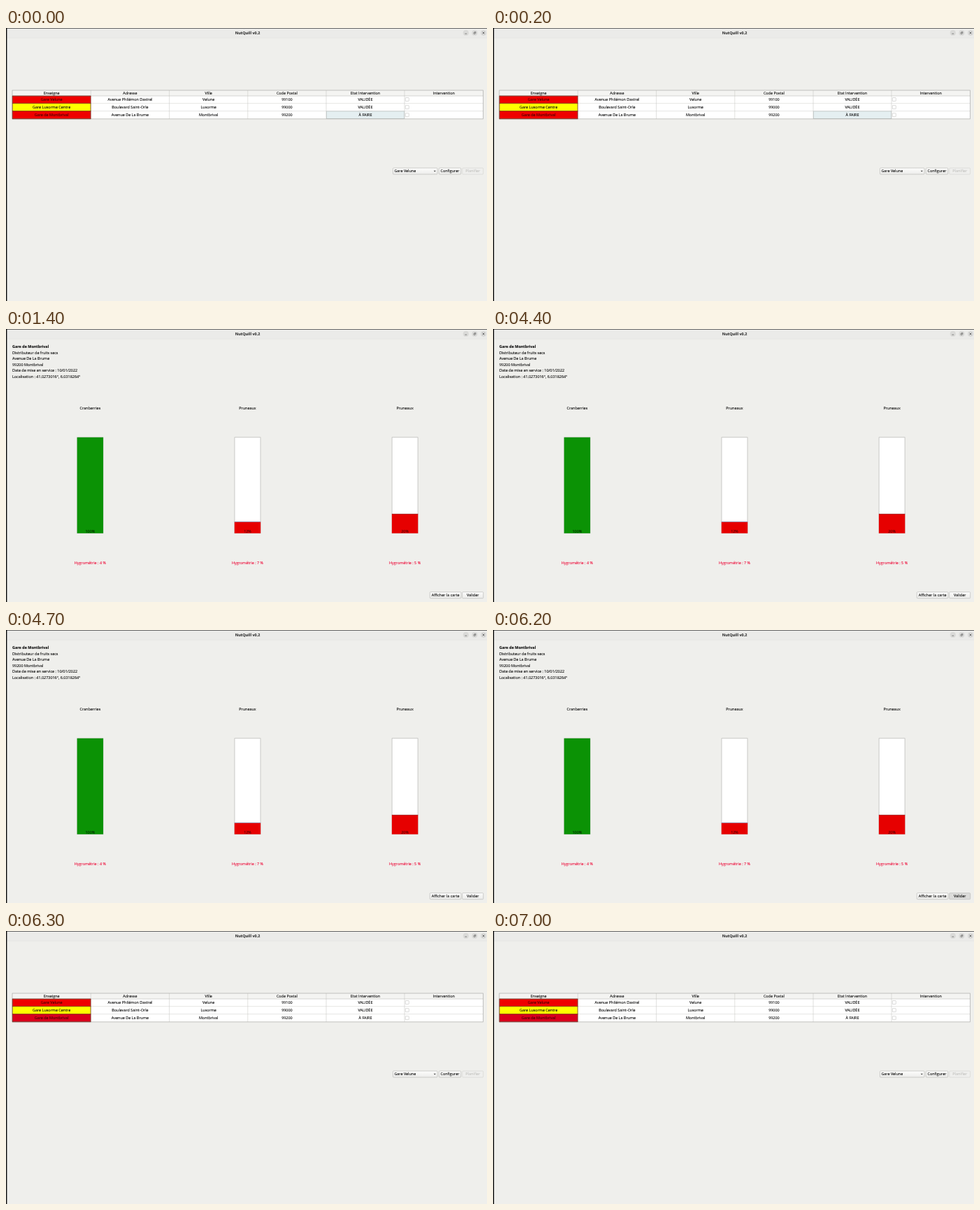
An HTML page for the animation above (8000 ms loop, 688 px wide and 390 px high).

```html
<!DOCTYPE html>
<html lang="fr">
<head>
<meta charset="utf-8">
<title>NutQuill</title>
<style>
  html, body { margin: 0; width: 100%; height: 100%; overflow: hidden; background: #efefec; }
  svg { display: block; width: 688px; height: 390px; }
  text {
    font: 500 5.45px "Open Sans", "Noto Sans", sans-serif;
    fill: #0c0c0c; stroke: currentColor; stroke-width: 0.1px; color: #0c0c0c;
    white-space: pre; text-rendering: geometricPrecision;
  }
  .bold { font-weight: 700; }
  .mid { text-anchor: middle; }
</style>
</head>
<body>
<svg id="stage" viewBox="0 0 688 390" xmlns="http://www.w3.org/2000/svg">
  <defs>
    <linearGradient id="face" x2="0" y2="1">
      <stop offset="0" stop-color="#fdfdfc"/>
      <stop offset="1" stop-color="#ececea"/>
    </linearGradient>
  </defs>
</svg>
<script>
const NS = 'http://www.w3.org/2000/svg';
const stage = document.getElementById('stage');

function add(parent, tag, attrs = {}) {
  const el = document.createElementNS(NS, tag);
  for (const key in attrs) el.setAttribute(key, attrs[key]);
  return parent.appendChild(el);
}

const rect = (parent, x, y, width, height, fill, more) =>
  add(parent, 'rect', { x, y, width, height, fill, ...more });

const line = (parent, d, stroke, width = 0.6) =>
  add(parent, 'path', { d, stroke, 'stroke-width': width, fill: 'none' });

// y is the middle of the capitals
function label(parent, str, x, y, cls = 'mid', color) {
  const el = add(parent, 'text', { x, y: y + 1.95, class: cls });
  if (color) el.style.fill = el.style.color = color;
  el.textContent = str;
  return el;
}

function button(parent, str, x, y, w, enabled = true) {
  const box = rect(parent, x, y, w, 9, enabled ? 'url(#face)' : '#efefed',
    { rx: 1, stroke: enabled ? '#b4b4b1' : '#d2d2cf', 'stroke-width': 0.6 });
  label(parent, str, x + w / 2, y + 4.5, 'mid', enabled ? '' : '#c3c3c0');
  return box;
}

function drawWindow() {
  rect(stage, 0, 0, 688, 390, '#efefec');
  rect(stage, 0, 0, 688, 14, '#ebebe9');
  line(stage, 'M0 14.2H688', '#dededb', 0.5);
  label(stage, 'NutQuill v0.2', 345.6, 7.2, 'mid bold', '#303030');
  for (const cx of [657.8, 670.4, 683]) {
    add(stage, 'circle', { cx, cy: 7, r: 4.1, fill: '#dadad8' });
  }
  line(stage, 'M656.4 8.2h2.8', '#444');
  line(stage, 'M669.1 6.4h2v2h-2zM669.9 5.6h2v2', '#444', 0.5);
  line(stage, 'M681.6 5.6l2.8 2.8M684.4 5.6l-2.8 2.8', '#444', 0.7);
}

const edges = [9, 121.3, 233.6, 345.8, 458, 570, 682.6];
const tops = [97, 107.7, 118.7, 129.8];
const heads = ['Enseigne', 'Adresse', 'Ville', 'Code Postal', 'Etat Intervention', 'Intervention'];
const rows = [
  ['Gare Velune', 'Avenue Philémon Dastrel', 'Velune', '99100', 'VALIDÉE'],
  ['Gare Lusorme Centre', 'Boulevard Saint-Orle', 'Lusorme', '99000', 'VALIDÉE'],
  ['Gare de Montbrival', 'Avenue De La Brume', 'Montbrival', '99200', 'À FAIRE']
];
const rowFills = ['#ef0000', '#ffff00', '#ef0000'];

function drawTable() {
  const g = add(stage, 'g');
  const mid = i => (edges[i] + edges[i + 1]) / 2;
  rect(g, 9, 89, 673.6, 8, '#f4f4f2');
  rect(g, 9, 97, 673.6, 32.8, '#fff');

  const fills = rowFills.map((fill, r) =>
    rect(g, 9, tops[r], 112.3, tops[r + 1] - tops[r], fill));
  const cell = rect(g, 458.3, 118.9, 111.5, 10.7, '#e5eff1',
    { stroke: '#a9b4b6', 'stroke-width': 0.6 });

  for (const y of tops.slice(1, 3)) line(g, `M121.3 ${y}H682.6`, '#d4d4d2', 0.6);
  for (const x of edges.slice(1, 6)) line(g, `M${x} 89V129.8`, '#cbcbc8', 0.6);
  line(g, 'M9 97H682.6', '#bdbdba', 0.6);
  rect(g, 9, 89, 673.6, 40.9, 'none', { stroke: '#aaaaa7', 'stroke-width': 0.7 });
  for (const y of tops) line(g, `M9 ${y}H121.3`, '#5c1400', 0.7);
  line(g, 'M9.2 97V129.8M121.1 97V129.8', '#5c1400', 0.6);

  heads.forEach((str, i) => label(g, str, mid(i), 93.3));
  rows.forEach((row, r) => {
    const y = [102, 113.1, 124.2][r];
    row.forEach((str, i) => label(g, str, mid(i), y, 'mid', i || r === 1 ? '' : '#480000'));
    rect(g, 571.3, y - 2.5, 5, 5, '#fff', { rx: 0.6, stroke: '#c2c2bf', 'stroke-width': 0.6 });
  });

  rect(g, 553.5, 200, 63.5, 9, 'url(#face)', { rx: 1, stroke: '#b4b4b1', 'stroke-width': 0.6 });
  label(g, 'Gare Velune', 555.4, 204.5, '');
  add(g, 'path', { d: 'M611.7 203.7h3.2l-1.6 1.9z', fill: '#444' });
  button(g, 'Configurer', 619.3, 200, 31.4);
  button(g, 'Planifier', 652.8, 200, 29.8, false);
  return { g, cell, lastFill: fills[2] };
}

const facts = [
  'Gare de Montbrival', 'Distributeur de fruits secs', 'Avenue De La Brume', '99200 Montbrival',
  'Date de mise en service : 10/01/2022', 'Localisation : 41.0273016°, 6.0318264°'
];
const tanks = [
  { name: 'Cranberries', level: 100, damp: 4, fill: '#0b9205', ink: '#042c02' },
  { name: 'Pruneaux', level: 12, damp: 7, fill: '#e60000', ink: '#500000', rim: '#8b9ac0' },
  { name: 'Pruneaux', level: 20, damp: 5, fill: '#e60000', ink: '#500000', rim: '#9c1414' }
];

function drawDetail() {
  const g = add(stage, 'g');
  facts.forEach((str, i) => label(g, str, 9, 25 + i * 8.55, i ? '' : 'bold'));
  tanks.forEach((tank, i) => {
    const x = 120.4 + i * 225.1;
    const top = 154.8, full = 137;
    const h = full * tank.level / 100;
    label(g, tank.name, x, 113);
    rect(g, x - 18.5, top, 37, full, '#fff', { stroke: '#b5b5b2', 'stroke-width': 0.7 });
    rect(g, x - 18.7, top + full - h, 37.4, h, tank.fill);
    if (tank.rim) line(g, `M${x - 18.7} ${top + full - h}h37.4`, tank.rim, 0.8);
    label(g, tank.level + '%', x, 289, 'mid', tank.ink);
    label(g, `Hygrométrie : ${tank.damp} %`, x, 334, 'mid', '#ee0f3c');
  });
  button(g, 'Afficher la carte', 606.3, 375.7, 44.6);
  const ok = button(g, 'Valider', 652.7, 375.7, 30);
  return { g, ok };
}

drawWindow();
const table = drawTable();
const detail = drawDetail();
rect(stage, 0, 0, 1.4, 390, '#0c0c0c');
rect(stage, 0, 0, 688, 0.6, '#0c0c0c');

const LOOP = 8000;
const steps = [
  { at: 0, view: 'table', selected: true },
  { at: 1400, view: 'detail' },
  { at: 6200, view: 'detail', pressed: true },
  { at: 6300, view: 'table' }
];

const show = (el, on) => el.setAttribute('visibility', on ? 'inherit' : 'hidden');

function render(t) {
  const step = steps.filter(s => s.at <= t).pop();
  show(table.g, step.view === 'table');
  show(detail.g, step.view === 'detail');
  show(table.cell, step.selected);
  table.lastFill.setAttribute('fill', step.selected ? '#ef0000' : '#d9001c');
  detail.ok.setAttribute('fill', step.pressed ? '#dcdcda' : 'url(#face)');
}

const start = performance.now();
function tick() {
  render((performance.now() - start) % LOOP);
  requestAnimationFrame(tick);
}
tick();
</script>
</body>
</html>
```
